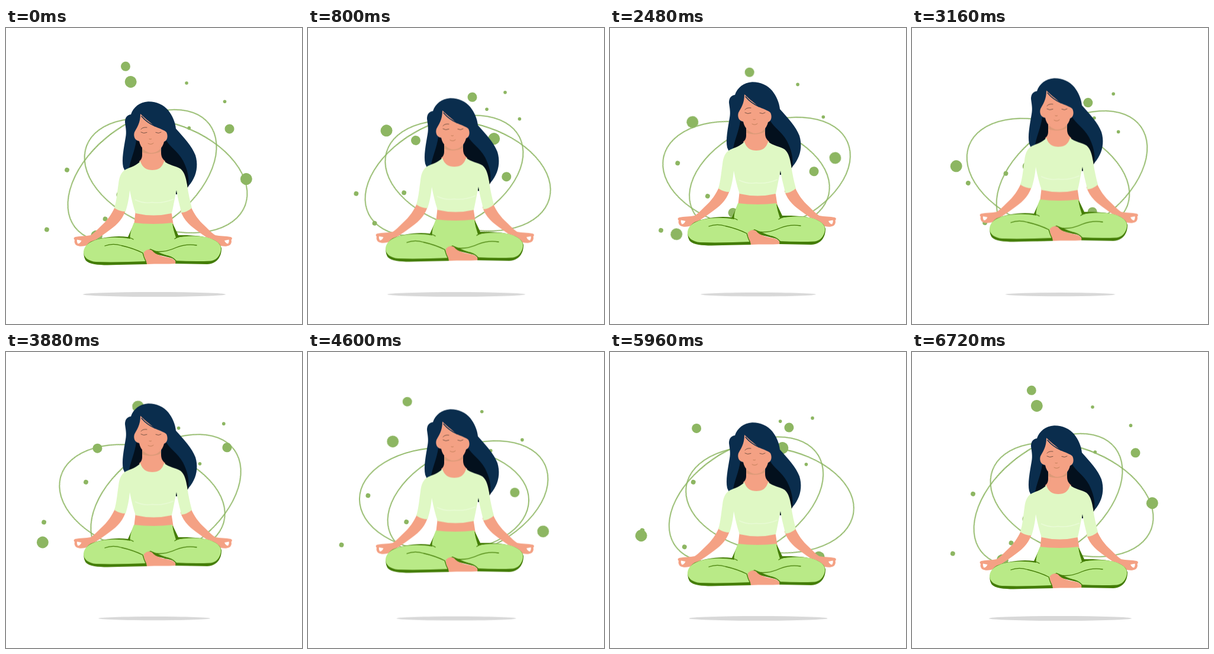
Recreate the animation shown at these times as an HTML page without scripts. Size 500 by 500 pixels, loop 6760 ms.

```html
<!DOCTYPE html>
<html lang="en">
<head>
<meta charset="utf-8">
<title>Floating meditation</title>
<style>
  html, body { margin: 0; width: 100%; height: 100%; overflow: hidden; background: #fff; }
  svg { display: block; width: 100vw; height: 100vh; }

  .body, .shadow, .ring { animation: 6760ms cubic-bezier(.333, 0, .667, 1) infinite; }
  .body { animation-name: float; }
  .shadow { animation-name: shrink; }
  .ring { animation-name: sway; fill: none; stroke: #8db662; stroke-width: 1.8; }
  .ring.a { --from: -37.6deg; --to: 21deg; animation-delay: -100ms; }
  .ring.b { --from: 21deg; --to: -37.6deg; animation-delay: -6560ms; }

  /* three dots share one closed three-lobed track */
  .dots circle {
    r: 2.8px; fill: #8db662;
    offset-path: path("M-25-50C-20.5-51.2-16-50-12.4-47.2C-6-42.5-3-37.5 3.2-34.2C12-29.5 22.5-31.5 32-27C35-25.5 38.5-21.8 39.7-18.3C43-9 36-.5 31 6.5C24 14 20.5 20 19 28C18.4 31.5 18.8 34.5 18 38C16.5 45 6 49-2 46C-8 43.7-12.5 39.7-15.5 35.5C-18 32-20 28.5-21 25C-23 17-20.5 5-24.8-2.2C-25.8-3.8-26.9-5-28.3-6.1C-32-9-36-10.8-38.6-14.7C-41.3-19-43.3-25-42-31C-40.4-38.5-33.5-47.8-25-50Z");
    offset-rotate: 0deg;
    animation: orbit 6760ms linear infinite;
  }
  .dots :nth-child(1) { --d: 0%; }
  .dots :nth-child(2) { --d: 26.6%; }
  .dots :nth-child(3) { --d: 67.6%; }

  @keyframes float {
    0%, 99.4%, 100% { transform: translateY(0); }
    49.7% { transform: translateY(-39.8px); }
  }
  @keyframes shrink {
    0%, 99.4%, 100% { transform: scale(1); }
    49.7% { transform: scale(.767); }
  }
  @keyframes sway {
    0%, 99.4%, 100% { transform: rotate(var(--from)); }
    49.7% { transform: rotate(var(--to)); }
  }
  @keyframes orbit {
    0% { offset-distance: var(--d); }
    99.4%, 100% { offset-distance: calc(var(--d) + 100%); }
  }

  .hair { fill: #0a2d4d; }
  .deep { fill: #03101d; }
  .skin { fill: #f4a184; }
  .top { fill: #dff8c4; }
  .leg { fill: #b9ea87; }
  .dark { fill: #437c05; }
  .line { fill: none; stroke: #437c05; stroke-width: 1.3; stroke-linecap: round; }
  .face { fill: none; stroke: #5a4034; stroke-width: .8; stroke-linecap: round; }
  .soft { stroke: #b5764f; }
</style>
</head>
<body>
<svg viewBox="0 0 500 500">
  <defs>
    <g id="arm">
      <path class="skin" fill-rule="evenodd" d="M184 302C179 314 171 325 161 334C154 341 148 347 143 350C135 352 125 351 117 353C114 354 114 356 116 358C115 361 116 365 119 367C124 370 133 369 139 366C147 360 158 354 170 345C184 335 196 326 202 308ZM120 357.5L127.500 359C126 362 124 364.500 121.500 364.500C120 362 119.500 360 120 357.500Z"/>
    </g>
  </defs>

  <g transform="translate(250.500 450)"><ellipse class="shadow" rx="120.500" ry="4" fill="#d8d8d8"/></g>

  <g transform="translate(230 249.500)"><ellipse class="ring a" rx="143" ry="88"/></g>
  <g transform="translate(270 249.500)"><ellipse class="ring b" rx="143" ry="88"/></g>

  <g class="dots" transform="translate(330 143)"><circle/><circle/><circle/></g>
  <g class="dots" transform="translate(121.300 282.400) rotate(15.500) scale(1.4 -1.4)"><circle/><circle/><circle/></g>
  <g class="dots" transform="translate(260.100 213.700) rotate(5.200) scale(2.86)"><circle/><circle/><circle/></g>
  <g class="dots" transform="translate(207 246.700) rotate(245.900) scale(3.56 -3.56)"><circle/><circle/><circle/></g>

  <g class="body">
    <!-- hair and neck -->
    <path class="hair" d="M240 124.300C226 125 215 134 211 146C204 147 201 152 201 159C202 168 204 175 202 185C199 203 195 222 198 235L203 246L285 262L287 281C301 277 311 266 317 254C323 242 324 228 320 215C314 199 301 186 287 170C286 159 281 148 274 139C266 129.500 254 124 240 124.300Z"/>
    <path class="deep" d="M220 190C218 207 210 222 207 242L234 220V196ZM264 195L271 190C276 200 290 208 299 224C306 238 310 252 308 268C302 275 295 279 287 281V262L260 225Z"/>
    <path class="skin" d="M230 195V214C230 220 228 223 225 225L232 245H262L269 225C264 221 262 217 262 210V195Z"/>
    <path fill="#dc9a78" d="M230 205V210C240 214 254 213 262 208V204Z"/>
    <path class="skin" d="M227 145C233 151 243 159 251 166C259 170 267 172 271 176C274 182 273 190 267 192C265 202 256 211 246 211C237 211 227 203 225 191C217 190 215 182 217 176C221 168 227 161 227 145Z"/>
    <path class="face" d="M229 149Q238 160 252 166" style="stroke:#0a2d4d;stroke-width:1.5"/>
    <path class="face" d="M228 171Q231 167 238 168M228 176Q232.500 179 238 176.500M253 176.500Q258 179 262 176"/>
    <path class="face soft" d="M240 195Q245 198 249 194.500M242 187.500Q244 188.500 245.500 187.500"/>

    <!-- arms and waist -->
    <use href="#arm"/>
    <use href="#arm" transform="translate(496.500) scale(-1 1)"/>
    <path class="skin" d="M219 308L216 334H283L279 308Z"/>

    <!-- top -->
    <path class="top" d="M227 225C230 236 238 240 247 240C257 240 264 236 267 225C275 232 287 233 295 238C302 244 304 254 306 265C308 280 311 293 314 304Q306 311 296 312C294 300 290 289 288 274C285 287 283 300 280 313Q249 320 219 313C215 302 212 289 209 274C208 288 205 300 202 310Q192 310 183 304C187 291 188 276 190 263C191 251 195 243 202 239C211 235 221 232 227 225Z"/>
    <path d="M218 290Q232 297 247 294.500Q264 297 283 289" fill="none" stroke="#e9fbd6" stroke-width="1.500"/>

    <!-- legs -->
    <path class="dark" d="M215.500 332L206 353C184 350 160 354 143 361C130 369 129 384 135 393C143 401 166 401 190 400L238 399L236 378L286 390V398L340 399C356 398 364 387 364 372C361 358 340 349 291 350L282 331Z"/>
    <path class="leg" d="M216 329Q249 333 281 329C282 339 285 347 287 354C305 351 330 350 347 356C359 361 364 367 363 375C361 386 355 392 346 393.500C326 394.500 306 394 286 393C281 386 266 383 256 378L244 373L233 379L236 394C210 395 180 396 152 395C140 394 131 388 131 378C132 367 141 361 155 357C172 353 192 353 210 356Q208 349 216 329Z"/>
    <path class="line" d="M205 354.500Q211 354 215 357M285 356Q292 351 305 351"/>
    <path class="line" d="M167 368Q180 363 195 367.500Q215 372 231 380Q233 388 237 396M322 367Q304 364 287 371Q268 380 248 377"/>
    <path class="line" d="M247 376Q254 383 268 384Q281 386 287 393" stroke-width="3.200"/>
    <path class="skin" d="M233 379C236 374 243 373 247 376C253 384 266 386 276 388C284 390 288 394 286 398C274 399 254 398 238 399C238 393 232 387 233 379Z"/>
  </g>
</svg>
</body>
</html>
```
